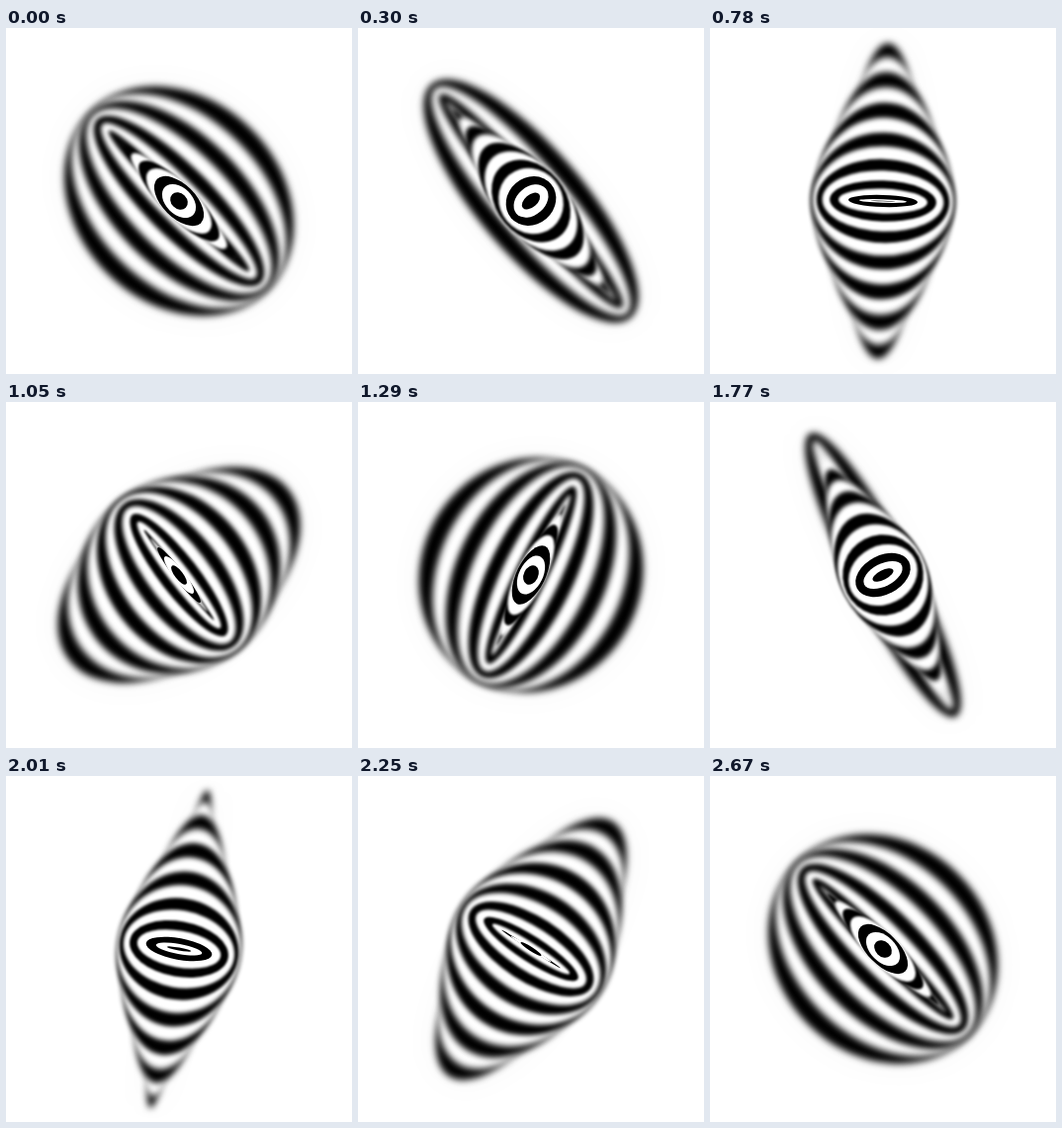
These frames come from a looping animation (350 px wide and 350 px high, 2700 ms). An HTML page with a canvas:

```html
<!DOCTYPE html>
<html lang="en">
<head>
<meta charset="utf-8">
<title>Twisting rings</title>
<style>
  html, body { margin: 0; width: 100%; height: 100%; overflow: hidden; background: #fff; }
  canvas { display: block; width: 350px; height: 350px; }
</style>
</head>
<body>
<canvas id="stage" width="350" height="350"></canvas>
<script>
const ctx = document.getElementById('stage').getContext('2d');
const LOOP = 2700, STEP = 30;
const RINGS = 15, RADIUS = 164, LAG = 5.6, BLUR = 0.25;
const rad = deg => deg * Math.PI / 180;

const ease = u => u < 0.5
  ? 0.5 * Math.pow(2 * u, 2.45)
  : 1 - 0.5 * Math.pow(2 - 2 * u, 2.45);

function disc(n, u, color, blur) {
  const r = RADIUS * Math.pow(n / RINGS, 0.95);
  const phase = rad(45 + 180 * u - LAG * n);
  const turn = rad(45 + 360 * ease(u));
  ctx.filter = blur > 0.3 ? `blur(${blur}px)` : 'none';
  ctx.fillStyle = color;
  ctx.beginPath();
  ctx.ellipse(175, 175, Math.abs(r * Math.cos(phase)), Math.abs(r * Math.sin(phase)), turn, 0, 2 * Math.PI);
  ctx.fill();
}

function draw(u) {
  ctx.filter = 'none';
  ctx.fillStyle = '#fff';
  ctx.fillRect(0, 0, 350, 350);
  disc(RINGS, u, 'rgba(0,0,0,0.04)', 15); // faint halo
  // Alternating discs, largest first; each one trails the one inside it.
  for (let n = RINGS; n > 0; n--) {
    disc(n, u, n % 2 ? '#000' : '#fff', BLUR * n);
  }
}

const start = performance.now();
function tick() {
  const t = (performance.now() - start) % LOOP;
  draw(Math.floor(t / STEP) * STEP / LOOP);
  requestAnimationFrame(tick);
}
tick();
</script>
</body>
</html>
```
